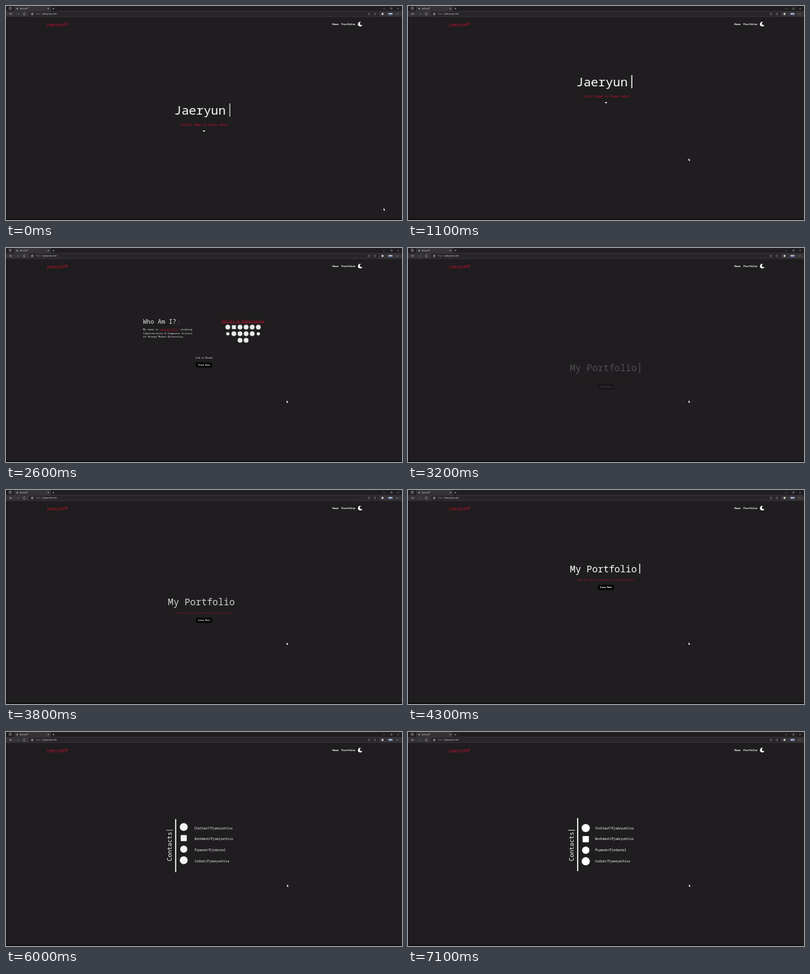
Recreate the animation shown at these times as an HTML page with a canvas. Size 600x325 px, loop 7200 ms.

```html
<!DOCTYPE html>
<html lang="en">
<head>
<meta charset="utf-8">
<title>JaeryunP</title>
<style>
html, body { margin: 0; width: 100%; height: 100%; overflow: hidden; background: #1f1d1f; }
canvas { display: block; width: 600px; height: 325px; }
</style>
</head>
<body>
<canvas id="stage"></canvas>
<script>
const W = 600, H = 325, LOOP = 7200, STEP = 100;
const MONO = '"Noto Sans Mono", "DejaVu Sans Mono", monospace';
const SANS = '"Open Sans", "Noto Sans", sans-serif';
const BG = '#1f1d1f', RED = '#c4122f', WHITE = '#fff';

const canvas = document.getElementById('stage');
const ctx = canvas.getContext('2d');
const dpr = window.devicePixelRatio || 1;
canvas.width = W * dpr;
canvas.height = H * dpr;

// Linear track through [time, value] pairs
function track(t, ...keys) {
  if (t <= keys[0][0]) return keys[0][1];
  for (let i = 1; i < keys.length; i++) {
    const [t0, v0] = keys[i - 1], [t1, v1] = keys[i];
    if (t <= t1) return v0 + (v1 - v0) * (t - t0) / (t1 - t0);
  }
  return keys[keys.length - 1][1];
}

// CSS "ease" curve: cubic-bezier(.25, .1, .25, 1)
function ease(x) {
  const curve = (s, a, b) => 3 * a * s * (1 - s) ** 2 + 3 * b * s * s * (1 - s) + s ** 3;
  let lo = 0, hi = 1;
  for (let i = 0; i < 20; i++) {
    const mid = (lo + hi) / 2;
    if (curve(mid, .25, .25) < x) lo = mid; else hi = mid;
  }
  return curve(lo, .1, 1);
}

// Caret fades in for half a second, then out
function blink(t) {
  const p = ((t + 180) % 1000) / 500;
  return p < 1 ? ease(p) : 1 - ease(p - 1);
}

function group(alpha, x, y, draw) {
  if (alpha <= 0) return;
  ctx.save();
  ctx.globalAlpha = Math.min(1, alpha);
  ctx.translate(x, y);
  draw();
  ctx.restore();
}

// y is the middle of the capitals
function text(str, x, y, size, color = WHITE, { weight = 400, align = 'left', family = MONO } = {}) {
  ctx.font = `${weight} ${size}px ${family}`;
  ctx.textAlign = align;
  ctx.fillStyle = color;
  ctx.fillText(str, x, y + size * .357);
}

function rect(x, y, w, h, color, r = 0) {
  ctx.fillStyle = color;
  ctx.beginPath();
  ctx.roundRect(x, y, w, h, r);
  ctx.fill();
}

function disc(x, y, r, color = WHITE) {
  ctx.fillStyle = color;
  ctx.beginPath();
  ctx.arc(x, y, r, 0, Math.PI * 2);
  ctx.fill();
}

function path(points, color, close = false) {
  ctx.beginPath();
  points.forEach(([x, y], i) => i ? ctx.lineTo(x, y) : ctx.moveTo(x, y));
  if (close) {
    ctx.fillStyle = color;
    ctx.fill();
  } else {
    ctx.strokeStyle = color;
    ctx.lineWidth = .6;
    ctx.stroke();
  }
}

function ring(x, y, r, color, from = 0, to = Math.PI * 2) {
  ctx.strokeStyle = color;
  ctx.lineWidth = .6;
  ctx.beginPath();
  ctx.arc(x, y, r, from, to);
  ctx.stroke();
}

function caret(t, x, y, w, h) {
  group(ctx.globalAlpha * blink(t), 0, 0, () => rect(x, y, w, h, WHITE));
}

function pill(label, y) {
  rect(287.5, y - 4, 25, 8, '#000', 4);
  text(label, 300, y, 3.1, WHITE, { weight: 700, align: 'center' });
}

function browser() {
  const dim = '#8c8a8c', lit = '#c8c6c8';
  rect(0, 0, W, 8, '#201e20');
  rect(12, 0, 56, 8, '#353336', 1.5);
  rect(0, 7.5, W, 9, '#353336');
  rect(35, 8.7, 530, 6.6, '#272528', 2);

  ctx.strokeStyle = lit;
  ctx.lineWidth = .6;
  ctx.strokeRect(5, 2, 3, 3);
  disc(17, 4, 1, lit);
  text('JaeryunP', 21, 3.9, 3, '#d8d6d8', { family: SANS });
  path([[63.2, 3], [65, 4.8]], lit);
  path([[65, 3], [63.2, 4.8]], lit);
  path([[70.8, 4], [73.2, 4]], lit);
  path([[72, 2.8], [72, 5.2]], lit);

  path([[571.5, 4], [574, 4]], dim);
  ctx.strokeRect(583, 2.8, 2, 2);
  path([[593, 2.9], [595, 4.9]], dim);
  path([[595, 2.9], [593, 4.9]], dim);

  path([[9.5, 12], [5.5, 12]], lit);
  path([[7, 10.5], [5.5, 12], [7, 13.5]], lit);
  path([[16, 12], [20, 12]], '#646266');
  path([[18.5, 10.5], [20, 12], [18.5, 13.5]], '#646266');
  ring(28, 12, 1.7, lit, .4, 5.8);
  ctx.strokeRect(38.7, 11.6, 2.2, 2);
  ring(39.8, 11.4, .8, lit, Math.PI, 0);
  text('https://', 45, 12, 3.25, dim, { family: SANS });
  const start = 45 + ctx.measureText('https://').width;
  text('jaeryunp.com', start, 12, 3.25, '#f0eef0', { family: SANS });

  ring(550, 12, 1.4, dim);
  ring(559, 12, 1.4, dim);
  disc(570.5, 12, 1.7, lit);
  rect(579.5, 10.8, 6, 2.5, '#dfe4f2');
  rect(579.5, 12.2, 6, 1, '#3d5fb8');
  for (let i = 0; i < 3; i++) disc(591.5 + i * 1.5, 12, .45, lit);
}

function nav() {
  group(1, 61, 28.5, () => {
    ctx.rotate(-.025);
    text('JaeryunP', 0, 0, 6.9, RED);
  });
  text('Home', 494.6, 27.5, 3.95, WHITE, { weight: 700 });
  text('Portfolio', 508.2, 27.5, 3.95, WHITE, { weight: 700 });
  ctx.fillStyle = WHITE;
  ctx.beginPath();
  ctx.arc(536.8, 27.5, 3.5, -1.25, .35, true);
  ctx.quadraticCurveTo(536.7, 29.6, 536, 27.2);
  ctx.quadraticCurveTo(535.8, 25, 537.9, 24.2);
  ctx.fill();
}

function hero(t) {
  const y = track(t, [800, 158], [900, 149], [1100, 115], [1300, 78], [1500, 40]);
  const bob = t < 900 ? 1.2 * Math.sin(t / 900 * Math.PI * 2) : 0;
  group(track(t, [1150, 1], [1500, 0]), 0, y, () => {
    text('Jaeryun', 254.8, 0, 18.6);
    caret(t, 338.3, -10, 1.7, 20);
    text('Scroll down to learn more', 300, 22, 4.67, RED, { align: 'center' });
    path([[298, 31 + bob], [302, 31 + bob], [300, 33.2 + bob]], WHITE, true);
  });
}

function skills() {
  text('Skills & Experience', 328, 139.5, 5.78, RED);
  rect(328, 142.3, 66, .6, RED);
  for (let row = 0; row < 3; row++) {
    const count = row < 2 ? 6 : 2;
    for (let i = 0; i < count; i++) {
      const x = 361.2 + (i - (count - 1) / 2) * 9.25, y = 149.2 + row * 10;
      if (row === 0 && i === 1) rect(x - 3, y - 3, 6, 6, WHITE);
      else disc(x, y, row === 1 && (i === 0 || i === 5) ? 2.5 : 3.6);
    }
  }
}

function about(t) {
  const alpha = track(t, [1400, 0], [1600, .18], [2100, .72], [2400, .95], [2600, .9], [3000, .15], [3100, 0]);
  const slide = track(t, [1400, -16], [1600, -11], [2100, 0], [2400, 2]);
  const rise = track(t, [2400, 0], [2500, -10], [2700, -48], [3000, -115]);
  group(alpha, slide, rise, () => {
    text('Who Am I?', 205.5, 140.7, 9.35);
    caret(t, 259.4, 136, 1, 10.5);
    text('My name is ', 205.8, 152.7, 3.88);
    const x = 205.8 + ctx.measureText('My name is ').width;
    text('Jaeryun Poh', x, 152.7, 3.88, RED);
    const w = ctx.measureText('Jaeryun Poh').width;
    rect(x, 154.6, w, .4, RED);
    text(', studying', x + w, 152.7, 3.88);
    text('Cybersecurity & Computer Science', 205.8, 158.4, 3.88);
    text('at George Mason University.', 205.8, 164.1, 3.88);
  });
  group(alpha, -slide, rise, skills);
  const lift = track(t, [1400, 16], [1600, 12], [2100, 0]);
  group(alpha, 0, rise + lift, () => {
    text('Link to Résumé', 300, 196.3, 3.1, WHITE, { align: 'center' });
    pill('Click Here', 206.5);
  });
}

function portfolio(t) {
  const y = track(t, [3000, 186], [3200, 182.3], [3700, 172], [4000, 165], [4100, 153], [4300, 119.5], [4500, 115]);
  const alpha = track(t, [3000, 0], [3200, .22], [3600, .6], [4000, 1], [4300, 1], [4600, 0]);
  group(alpha, 0, y, () => {
    text('My Portfolio', 245.2, 0, 14.1);
    caret(t, 350.4, -7.5, 1.3, 15);
    text('Link to all my current & past projects.', 300, 17, 3.83, RED, { align: 'center' });
    pill('Learn More', 28.3);
  });
}

const LINKS = [
  'Chatleaf/Pjaeryuntiva',
  'Workmesh/Pjaeryuntiva',
  'Pipwren/Pjrdaniel',
  'Codrel/Pjaeryuntiva'
];

function contacts(t) {
  const off = track(t, [4400, 95], [4600, 45], [4800, 17], [4900, 14.5], [5100, 10], [5300, 6.8],
    [5600, 3.8], [6000, 1.6], [6500, .3], [6700, 0]);
  const alpha = track(t, [4300, 0], [4500, .12], [4800, .4], [5300, .78], [5700, .92], [6500, 1]);
  group(track(t, [4300, 0], [4800, .6], [5300, .95], [5700, 1]), 248, 196.2, () => {
    ctx.rotate(-Math.PI / 2);
    text('Contacts', 0, 0, 9.3);
    caret(t, 46.5, -5.5, 1, 10.5);
  });
  group(alpha, 0, off, () => rect(256.3, 130.7, 1.7, 80.5, WHITE));
  LINKS.forEach((label, i) => {
    const y = 145.9 + i * 16.8;
    group(alpha, 269.3, y - off, () => {
      const k = Math.max(.5, 1 - off * .022);
      ctx.scale(k, k);
      if (i === 1) rect(-4.8, -4.8, 9.6, 9.6, WHITE, 1);
      else disc(0, 0, i === 2 ? 5.6 : 6.2);
    });
    group(alpha, off * (i ? 1.3 : 1.05), 0, () => text(label, 283.6, y, 4.62));
  });
}

function pointer(t) {
  const p = track(t, [0, 0], [800, 1]);
  const k = p * p * (3 - 2 * p);
  const nudge = track(t, [4400, 0], [5000, .7]);
  group(1, 572 - 147 * k + nudge, 307 - 75.5 * k, () => {
    path([[0, 0], [0, 3.6], [.8, 2.9], [1.4, 4.2], [2, 3.9], [1.4, 2.7], [2.5, 2.6]], WHITE, true);
  });
}

function frame(now) {
  const t = Math.floor(now % LOOP / STEP) * STEP;
  ctx.setTransform(dpr, 0, 0, dpr, 0, 0);
  rect(0, 0, W, H, BG);
  hero(t);
  about(t);
  portfolio(t);
  contacts(t);
  nav();
  browser();
  rect(0, 16, .7, H, '#0c0b0c');
  rect(0, 323.5, W, 1.5, '#0c0b0c');
  pointer(t);
}

const began = performance.now();
function tick() {
  frame(performance.now() - began);
  requestAnimationFrame(tick);
}
tick();
</script>
</body>
</html>
```
